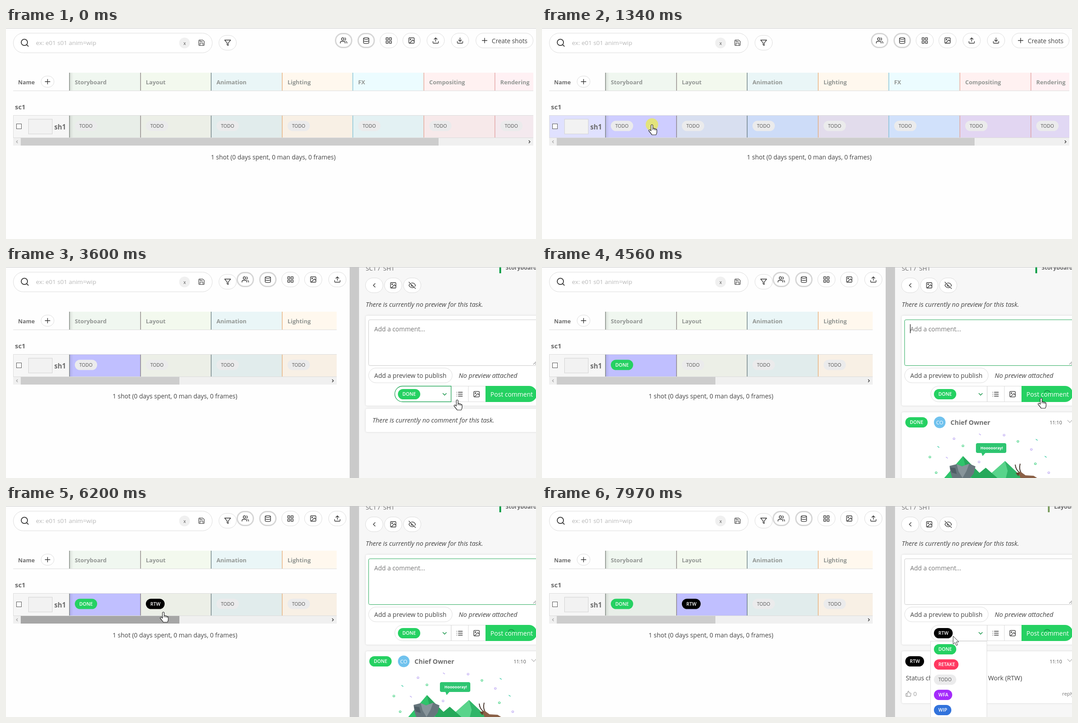
Write an HTML page that moves like this. It is 1186 px wide and 472 px high and loops after 8000 ms.

```html
<!DOCTYPE html>
<html lang="en">
<head>
<meta charset="utf-8">
<title>Shot list</title>
<style>
html, body { margin: 0; width: 100%; height: 100%; overflow: hidden; background: #fff; }
svg { display: block; width: 1186px; height: 472px; font-family: "Open Sans", "Noto Sans", sans-serif; }
text { white-space: pre; }
</style>
</head>
<body>
<svg viewBox="0 0 1186 472">
  <defs>
    <linearGradient id="edge"><stop stop-color="#000" stop-opacity=".09"/><stop offset="1" stop-color="#000" stop-opacity="0"/></linearGradient>
    <filter id="soft" x="-5%" y="-10%" width="110%" height="120%"><feDropShadow dx="0" dy="0" stdDeviation="2" flood-color="#000" flood-opacity=".13"/></filter>
  </defs>
  <g id="scene"></g>
  <g id="cursor">
    <circle id="click" r="14" fill="#e6e66e" fill-opacity=".9"/>
    <path id="arrow" d="M0 0V18L4.2 14.2 7 21 10 19.7 7.2 13H12.7Z" fill="#fff" stroke="#333"/>
    <path id="hand" d="M-2 1.5Q0-1 2 1.5V9Q4 7 5.5 9.5 7.5 8 8.5 10.5 11 9.5 11 12.5V17Q11 20 9 23H0Q-2 20-7 14-7 11-4 12L-2 14ZM2 9V12M5.5 9.5V12.5M8.5 10.5V13" fill="#fff" stroke="#222" stroke-width="1.2" stroke-linejoin="round"/>
  </g>
</svg>
<script>
const LOOP = 8000;
const $ = id => document.getElementById(id);
const GREEN = '#25d162', LINE = '#dcdcdc', FOCUS = '#27a95b', SELECTED = '#c0bfff';

const ICON = {
  lens: 'M11 3a8 8 0 1 0 0 16 8 8 0 0 0 0-16M21 21l-4.3-4.3',
  users: 'M17 21v-2a4 4 0 0 0-4-4H5a4 4 0 0 0-4 4v2M9 3a4 4 0 1 0 0 8 4 4 0 0 0 0-8M23 21v-2a4 4 0 0 0-3-3.9M16 3.1a4 4 0 0 1 0 7.8',
  disk: 'M3 5a9 3 0 1 0 18 0 9 3 0 1 0-18 0M3 5v14c0 1.7 4 3 9 3s9-1.3 9-3V5M3 12c0 1.7 4 3 9 3s9-1.3 9-3',
  grid: 'M3 3h7v7H3zM14 3h7v7h-7zM14 14h7v7h-7zM3 14h7v7H3z',
  image: 'M5 3h14a2 2 0 0 1 2 2v14a2 2 0 0 1-2 2H5a2 2 0 0 1-2-2V5a2 2 0 0 1 2-2zM8.5 7a1.5 1.5 0 1 0 0 3 1.5 1.5 0 0 0 0-3M21 15l-5-5L5 21',
  upload: 'M21 15v4a2 2 0 0 1-2 2H5a2 2 0 0 1-2-2v-4M17 8l-5-5-5 5M12 3v12',
  download: 'M21 15v4a2 2 0 0 1-2 2H5a2 2 0 0 1-2-2v-4M7 10l5 5 5-5M12 15V3',
  filter: 'M22 3H2l8 9.5V19l4 2v-8.5z',
  save: 'M19 21H5a2 2 0 0 1-2-2V5a2 2 0 0 1 2-2h11l5 5v11a2 2 0 0 1-2 2zM17 21v-8H7v8M7 3v5h8',
  hidden: 'M17.9 17.9A10 10 0 0 1 12 20c-7 0-11-8-11-8a18 18 0 0 1 5-6M9.9 4.2A9 9 0 0 1 12 4c7 0 11 8 11 8a18 18 0 0 1-2.2 3.2M14.1 14.1a3 3 0 1 1-4.2-4.2M1 1l22 22',
  list: 'M8 6h13M8 12h13M8 18h13M3 6h.01M3 12h.01M3 18h.01',
  like: 'M14 9V5a3 3 0 0 0-3-3l-4 9v11h11.3a2 2 0 0 0 2-1.7l1.4-9a2 2 0 0 0-2-2.3zM7 22H4a2 2 0 0 1-2-2v-7a2 2 0 0 1 2-2h3',
  plus: 'M12 4v16M4 12h16', left: 'M15 18l-6-6 6-6', right: 'M9 18l6-6-6-6', down: 'M5 9l7 7 7-7'
};

// name, header, row, hovered row, border
const COLUMNS = [
  ['Storyboard', '#f0f7f0', '#e8eee8', '#cecdff', '#667067'],
  ['Layout', '#f3f9ee', '#ecefe7', '#d8dff0', '#7b7070'],
  ['Animation', '#eaf6f7', '#e1ecec', '#cddcf8', '#566a70'],
  ['Lighting', '#fff8ee', '#f8f0e5', '#e2dcec', '#e6a368'],
  ['FX', '#ecfcff', '#e3f1f3', '#d1e1fb', '#6fb9d3'],
  ['Compositing', '#fff1f1', '#f7e9ea', '#e2d6f2', '#e59a86'],
  ['Rendering', '#fff1f4', '#f4e9ee', '#e1d8f4', '#dd9494']
];
const STATUS = {
  TODO: [50, '#ebebec', '#555'], DONE: [50, GREEN, '#fff'], RTW: [42, '#000', '#fff'],
  RETAKE: [55, '#ff3860', '#fff'], WFA: [41, '#a42bfb', '#fff'], WIP: [39, '#3273dc', '#fff']
};

const rect = (x, y, w, h, fill, more = '') => `<rect x="${x}" y="${y}" width="${w}" height="${h}" fill="${fill}" ${more}/>`;
const box = (x, y, w, h, r = 0, stroke = LINE, fill = '#fff', sw = 1) =>
  rect(x + .5, y + .5, w - 1, h - 1, fill, `rx="${r}" stroke="${stroke}" stroke-width="${sw}"`);
const path = (d, fill, more = '') => `<path d="${d}" fill="${fill}" ${more}/>`;
const text = (x, y, size, s, fill = '#444', more = '') => `<text x="${x}" y="${y}" font-size="${size}" fill="${fill}" ${more}>${s}</text>`;
const bold = (x, y, size, s, fill) => text(x, y, size, s, fill, 'font-weight="700"');
const italic = (x, y, size, s) => text(x, y, size, s, '#444', 'font-style="italic"');
const icon = (x, y, name, s = .67, color = '#333', sw = 2) =>
  path(ICON[name], 'none', `transform="translate(${x - 12 * s} ${y - 12 * s}) scale(${s})" stroke="${color}" stroke-width="${sw}" stroke-linecap="round" stroke-linejoin="round"`);
const button = (x, y, name, strong) =>
  (strong ? box(x - 18.5, y - 16, 37, 32, 15.5, '#d6d6d6', '#fff', 3) : box(x - 20, y - 17, 40, 34, 16.5)) + icon(x, y, name);
function badge(x, y, name) {
  const [w, fill, color] = STATUS[name];
  return rect(x, y, w, 23, fill, 'rx="11.5"') +
    text(x + 10, y + 15, 10.5, name, color, `font-weight="${name === 'TODO' ? 400 : 600}"`);
}

function toolbar(open) {
  const dx = open ? -220 : 0;
  const names = ['users', 'disk', 'grid', 'image', 'upload', 'download'];
  const xs = [755.5, 806, 856.5, 907.5, 961.5, 1016];
  return box(16, 11, 446, 45, 22) + icon(42, 33, 'lens', .87, '#333', 2.1) +
    text(67, 38, 13.5, 'ex: e01 s01 anim=wip', '#b9b9b9') +
    '<circle cx="399.5" cy="33.5" r="12" fill="#f0f0f0"/>' + text(397, 38, 10.5, 'x', '#555') +
    icon(437.5, 33, 'save', .68, '#555') + button(496, 33, 'filter') +
    names.map((n, i) => button(xs[i] + dx, 28, n, i < 2)).join('') +
    box(1051 + dx, 11, 129, 34, 16.5) + icon(1071 + dx, 28, 'plus', .68) + text(1087 + dx, 33.5, 13.7, 'Create shots');
}

function table(s) {
  const end = s.open ? 740 : 1180;
  const thumbEnd = s.open ? 388 : 968;
  let out = bold(27, 125.5, 12.5, 'Name', '#6e6e6e') + box(78, 107, 30, 26, 12.5) + icon(93, 120, 'plus', .68);
  out += bold(20, 182, 14.9, 'sc1', '#6b6b6b') + rect(16, 195, 126, 50, s.hover ? '#e0e1ff' : '#f6f6f6');
  COLUMNS.forEach(([name, head, row, lit, edge], i) => {
    const x = Math.round(142 + i * 158.6), w = Math.min(159, end - x);
    if (w <= 0) return;
    const fill = s.open && i === s.task ? SELECTED : s.hover ? lit : row;
    const status = i === 0 && s.posted ? 'DONE' : i === 1 && s.ready ? 'RTW' : 'TODO';
    out += rect(x, 100, w, 40, head) + rect(x, 195, w, 50, fill);
    if (!i) out += rect(x, 100, 9, 40, 'url(#edge)') + rect(x, 195, 9, 50, 'url(#edge)');
    out += rect(x - .5, 100, 1.2, 40, edge) + rect(x - .5, 195, 1.2, 50, edge) +
      bold(x + 12, 125.5, 12.8, name, '#929693') + badge(x + 12, 207.5, status);
  });
  out += rect(16, 140, end - 16, 1, LINE) + rect(16, 195, end - 16, 1, LINE) + rect(16, 245, end - 16, 1, LINE) + rect(16, 195, 1, 50, LINE);
  out += box(23, 214, 12, 12, 0, '#555') + box(50, 203.5, 54, 34, 0, '#d2d2d2', '#f2f2f2') + bold(108, 227, 15.1, 'sh1', '#6b6b6b');
  out += rect(16, 246, end - 16, 17, '#f0f0f0') + rect(33, 246, thumbEnd - 33, 17, s.bar ? '#a6a6a6' : '#cdcdcd') +
    icon(24.5, 254.5, 'left', .42, '#a5a5a5', 3) + icon(end - 8.5, 254.5, 'right', .42, '#444', 4);
  return out + text((16 + end) / 2, 294, 13.95, '1 shot (0 days spent, 0 man days, 0 frames)', '#444', 'text-anchor="middle"');
}

function party() {
  const colors = ['#2fc9a0', '#b9a4f2', '#35cf79'];
  const bits = [[887, 402], [922, 384], [942, 400], [980, 374], [1034, 376], [1065, 390], [1107, 386], [1095, 408], [868, 425], [906, 426], [978, 436], [1104, 440], [1127, 424], [1134, 460], [882, 460]];
  const confetti = bits.map(([x, y], i) => i % 3
    ? `<circle cx="${x}" cy="${y}" r="2" fill="none" stroke="${colors[i % 3]}" stroke-width="1.2"/>`
    : path(`M${x - 2} ${y - 1}l4 3`, 'none', `stroke="${colors[i % 2]}" stroke-width="1.4"`)).join('');
  return confetti + path('M900 472L942 423 990 472Z', '#2fc46b') + path('M942 423L948 448 962 472H990Z', '#27a85c') +
    path('M993 472L1036 434 1076 472Z', '#59d48b') + path('M1036 434L1042 456 1038 472H1076Z', '#30b568') +
    path('M965 472L993 449 1019 472Z', '#25a95a') +
    path('M912 445L928 441 940 446 956 440 970 446 966 462 958 472H918L914 459Z', '#67767d') +
    path('M928 441L940 446 956 440 950 456 941 472 932 457Z', '#87949a') + path('M913 448L925 450 928 463 917 460Z', '#4f5e66') +
    path('M1059 442Q1060 454 1069 460M1070 440Q1067 452 1072 460', 'none', 'stroke="#4a382f" stroke-width="2"') +
    path('M1060 461L1071 458 1082 466 1100 467 1108 472H1071L1068 466Z', '#8a6046') + path('M1060 461L1069 460 1066 468Z', '#64442f') +
    rect(971, 394, 68, 22, '#2ec571', 'rx="4"') + path('M983 415L986 423 993 415Z', '#2ec571') + bold(981, 408, 8.8, 'Hoooooray!', '#fff');
}

function comment(s) {
  if (!s.posted) return rect(805, 317, 400, 52, '#fff', 'rx="4" filter="url(#soft)"') + italic(820, 348, 14.3, 'There is currently no comment for this task.');
  const layout = s.task === 1;
  let out = rect(805, 325, 400, layout ? 116 : 170, '#fff', 'rx="4" filter="url(#soft)"') + badge(813, 336, layout ? 'RTW' : 'DONE');
  if (!s.menu) out += '<circle cx="890" cy="347.5" r="13" fill="#70c2ee"/>' +
    text(890, 352, 11.5, 'CO', '#fff', 'text-anchor="middle"') + bold(914, 353, 14.4, 'Chief Owner', '#6d6d6d');
  out += text(1136, 352, 10.8, '11:10', '#555') + icon(1181, 345, 'down', .7, '#aaa', 1.6);
  return out + (layout
    ? text(814, 390, 14.1, 'Status changed to Ready To Work (RTW)') + icon(820, 420, 'like', .58, '#999') +
      text(831, 425, 13.4, '0', '#999') + text(1164, 424, 11.3, 'reply', '#777')
    : party());
}

function menu(s) {
  const items = ['DONE', 'RETAKE', 'TODO', 'WFA', 'WIP'];
  return box(869, 302, 127, 180) + (s.option ? rect(870, 304, 125, 34, '#f2f2f2') : '') +
    items.map((n, i) => badge(877, 309 + i * 34, n)).join('');
}

function panel(s) {
  const layout = s.task === 1;
  const titleX = layout ? 1146 : 1118;
  let out = rect(769, 0, 21, 472, '#cacaca') + rect(790, 0, 396, 472, '#f7f7f7');
  out += text(805, 8, 13.5, 'SC1 /  SH1', '#666') + rect(titleX - 14, 0, 4, 14, layout ? '#7c9d60' : '#10a04a') +
    bold(titleX, 6, 12.6, COLUMNS[s.task][0], '#666');
  out += button(824, 41, 'left') + button(866.5, 41, 'image') + button(909, 41, 'hidden') +
    italic(805, 89, 14.4, 'There is currently no preview for this task.');
  out += rect(805, 109, 400, 201, '#fff', 'rx="4" filter="url(#soft)"') + box(811, 117.5, 390, 103.5, 3, s.typing ? FOCUS : '#cacaca') +
    text(824, 144, 13.9, 'Add a comment...', '#777') + path('M1180 218l6-6M1184 218l3-3', 'none', 'stroke="#555"');
  if (s.caret) out += rect(823.5, 128, 1.3, 20, '#222');
  out += box(811, 225.5, 188, 34, 16.5) + text(824, 247.5, 14.1, 'Add a preview to publish') + italic(1013, 247.5, 14.6, 'No preview attached');
  out += box(996, 266, 39, 36) + box(1034, 266, 40, 36) + icon(1015, 284.5, 'list', .7) + icon(1053, 284.5, 'image', .68);
  out += path('M996 266.5H887.5a17.5 17.5 0 0 0 0 35H996Z', '#fff', `stroke="${s.focus ? FOCUS : LINE}" stroke-width="${s.focus ? 1.3 : 1}"`) +
    badge(877, 273, s.status) + icon(981.5, 284.5, 'down', .55, '#159447', 2.6);
  out += path('M1073 266H1170a18 18 0 0 1 0 36H1073Z', s.status === 'TODO' ? '#666' : GREEN);
  if (s.posted || s.loading) out += path('M1124 281a7 7 0 0 1 13 0', 'none', 'stroke="#189b49" stroke-width="2"');
  if (!s.loading) out += text(1084, 289.5, 14.05, 'Post comment', '#fff');
  return out + comment(s) + (s.menu ? menu(s) : '');
}

// time, x, y of the pointer tip
const MOVES = [
  [530, 330, 436], [1270, 246, 216], [1420, 246, 216], [2110, 953, 289], [2450, 953, 289], [2770, 905, 326], [3260, 905, 326],
  [3600, 1009, 297], [3740, 1092, 294], [3940, 1117, 293], [4890, 1117, 293], [5220, 930, 334], [5650, 425, 269],
  [5900, 362, 248], [6200, 352, 237], [6470, 375, 237], [6680, 382, 222], [6890, 382, 222], [7630, 920, 291], [8000, 920, 291]
];
const CLICKS = [[1270, 1410], [2240, 2305], [2970, 3040], [4140, 4280], [6680, 6890], [7700, 7770]];

function pointer(t) {
  const i = Math.max(1, MOVES.findIndex(m => m[0] > t));
  const [t0, x0, y0] = MOVES[i - 1], [t1, x1, y1] = MOVES[i];
  const p = Math.max(0, (t - t0) / (t1 - t0));
  const k = t1 - t0 > 500 ? p * p * (3 - 2 * p) : p;
  return [x0 + (x1 - x0) * k, y0 + (y1 - y0) * k];
}

function stateAt(t, x, y) {
  const within = (a, b) => t >= a && t < b;
  const open = t >= 1480, task = t >= 6960 ? 1 : 0;
  const typing = within(4350, 6680);
  return {
    open, task, typing,
    hover: t >= 530 && t < 7100 && y > 195 && y < 245 && x < (open ? 740 : 1180) && !within(5650, 6230),
    bar: within(5720, 6230),
    posted: t >= 4480, ready: t >= 5030,
    loading: within(4280, 4480),
    status: task ? 'RTW' : t >= 2980 ? 'DONE' : 'TODO',
    menu: within(2370, 3040) || t >= 7840,
    option: within(2640, 3040),
    focus: within(2240, 2510) || within(2980, 4280) || within(7700, 7840),
    caret: typing && Math.floor((t - 4360) / 530) % 2 === 0
  };
}

let lastKey = '';
function render(t) {
  const [x, y] = pointer(t);
  const s = stateAt(t, x, y);
  const key = JSON.stringify(s);
  if (key !== lastKey) {
    lastKey = key;
    $('scene').innerHTML = rect(0, 0, 1186, 472, '#fefefe') + toolbar(s.open) + table(s) +
      (s.open ? panel(s) : '') + rect(0, 0, 1186, 1, '#c8c8c8');
  }
  const onRow = y > 195 && y < 246 && x > 142 && x < (s.open ? 740 : 1180);
  const onButton = s.open && x > 996 && y > 266 && y < 302;
  const hand = onRow || onButton || s.option;
  const show = (id, on) => $(id).setAttribute('visibility', on ? 'visible' : 'hidden');
  const shown = t >= 530;
  $('cursor').setAttribute('transform', `translate(${x.toFixed(1)} ${y.toFixed(1)})`);
  show('hand', shown && hand);
  show('arrow', shown && !hand);
  show('click', CLICKS.some(([a, b]) => t >= a && t < b));
}

const start = performance.now();
function tick(now) {
  render(Math.max(0, now - start) % LOOP);
  requestAnimationFrame(tick);
}
render(0);
requestAnimationFrame(tick);
</script>
</body>
</html>
```
